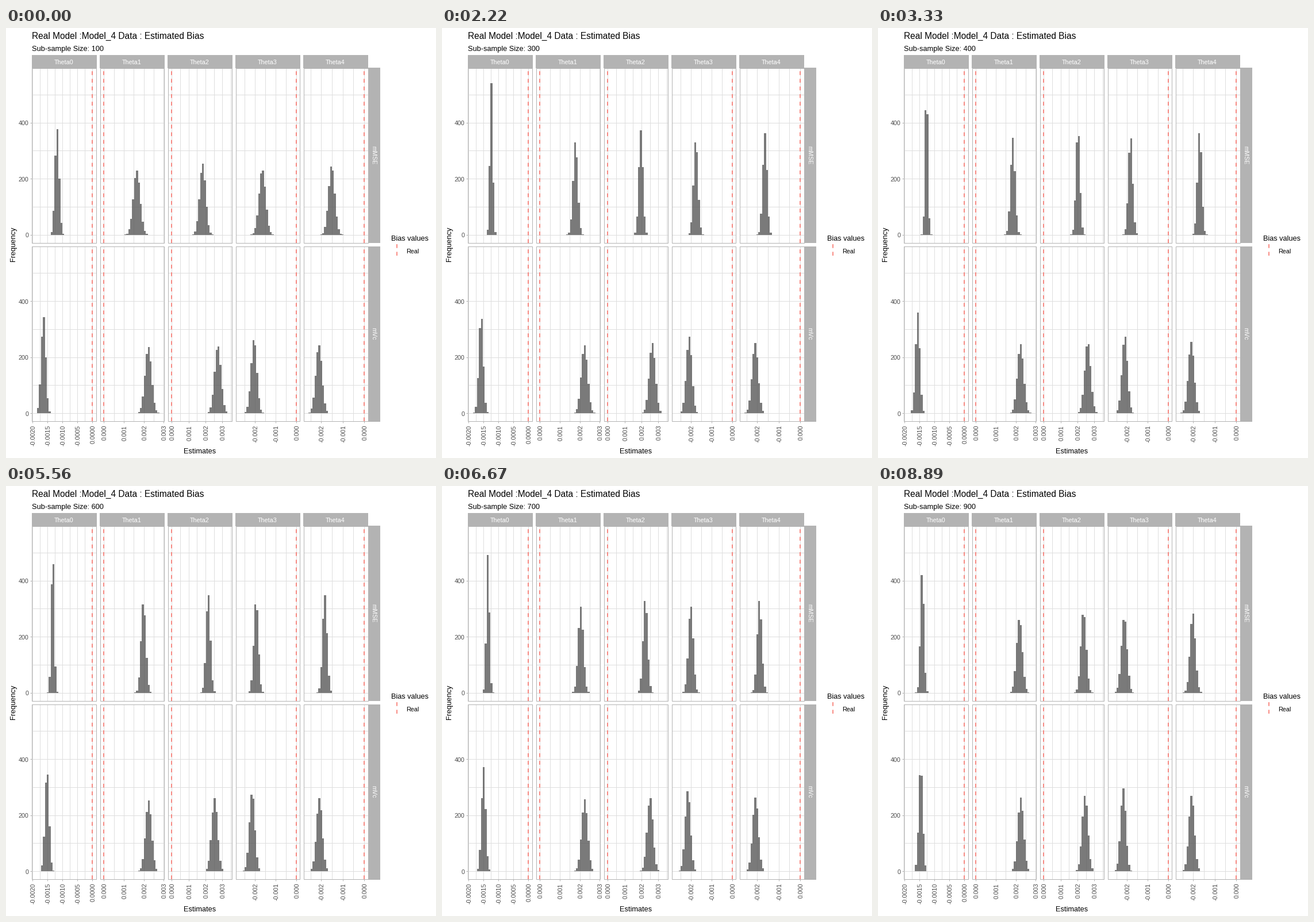
A matplotlib script for the animation above (10 s loop, 748 by 748 pixels).

```python
import math

import matplotlib.pyplot as plt
import numpy as np
from matplotlib.animation import FuncAnimation
from matplotlib.patches import Rectangle

SIDE, DPI = 748, 100
PT = 72 / DPI
GREY, GRID, RED, INK = "#B3B3B3", "#DEDEDE", "#F8766D", "#4D4D4D"
SMALL, BASE, BIG = 10.7, 12.8, 15.5

LEFT, PITCH, PANEL_W, PANEL_H = 45.5, 118.1, 111.7, 304
TOPS = (69.5, 380.0)
PAD = PANEL_W / 22
BINS = 30
BIN_W = (PANEL_W - 2 * PAD) / BINS
COUNT_H = PANEL_H / 1.1 / 567
SAMPLES = 1000

STEPS, FRAMES, LOOP = 9, 100, 10000

# Per column: side of zero the estimates lie on, px per 0.001, tick spacing.
AXES = (
    (-1, 52.0, 0.0005),
    (1, 34.7, 0.001),
    (1, 29.3, 0.001),
    (-1, 35.7, 0.001),
    (-1, 37.2, 0.001),
)

# Per column: first centre, last centre and first spread, in bins.
SHAPES = {
    "mMSE": ((10.81, 7.27, 1.00), (16.89, 22.35, 1.71), (15.85, 20.45, 1.54),
             (11.65, 6.45, 1.67), (12.35, 6.77, 1.58)),
    "mVc": ((3.79, 6.49, 1.11), (22.80, 23.03, 1.65), (23.64, 21.20, 1.60),
            (7.34, 5.92, 1.46), (5.80, 6.20, 1.60)),
}


def mmse_path(s):
    """Even drift; narrows quickly, then slowly widens again."""
    return s, 0.58 + 0.28 * s**2 + 0.42 * math.exp(-7 * s)


def mvc_path(s):
    """Drift that slows down a little; narrows slightly."""
    return s**0.85, 1 - 0.1 * s


PATHS = {"mMSE": mmse_path, "mVc": mvc_path}

plt.rcParams["font.family"] = "Liberation Sans"
fig = plt.figure(figsize=(SIDE / DPI, SIDE / DPI), dpi=DPI, facecolor="white")
ax = fig.add_axes([0, 0, 1, 1])
ax.set_xlim(0, SIDE)
ax.set_ylim(SIDE, 0)
ax.axis("off")


def text(x, y, s, size=SMALL, color="black", va="baseline", **kw):
    return ax.text(x, y, s, fontsize=size * PT, color=color, va=va, **kw)


def line(xs, ys, color=GRID, width=1.0, **kw):
    ax.plot(xs, ys, color=color, lw=width * PT, solid_capstyle="butt", **kw)


def box(x, y, w, h, **kw):
    ax.add_patch(Rectangle((x, y), w, h, **kw))


def dashes(x, bottom, top):
    line([x, x], [bottom, top], RED, 1.66, dashes=(4, 4),
         dash_capstyle="butt", zorder=4)


def panel_left(col):
    return LEFT + PITCH * col


def bin_edges(col):
    return panel_left(col) + PAD + BIN_W * np.arange(BINS + 1)


def zero_x(col):
    first = 0 if AXES[col][0] > 0 else BINS - 1
    return bin_edges(col)[first] + BIN_W / 2


def grid_lines(col):
    """Pairs of x and half-tick number for every line inside the panel."""
    side, scale, spacing = AXES[col]
    half = scale * spacing / 0.001 / 2
    room = PANEL_W - PAD - BIN_W / 2
    return [(zero_x(col) + side * k * half, k)
            for k in range(int(room / half) + 1)]


def counts(centre, spread):
    edges = np.arange(BINS + 1) - 0.5
    cdf = [0.5 * (1 + math.erf((e - centre) / spread / math.sqrt(2)))
           for e in edges]
    return np.rint(SAMPLES * np.diff(cdf))


def draw_panel(col, top):
    left, bottom = panel_left(col), top + PANEL_H
    base = bottom - PANEL_H / 22
    for n in range(0, 600, 100):
        line([left, left + PANEL_W], [base - n * COUNT_H] * 2, zorder=1)
    for x, _ in grid_lines(col):
        line([x, x], [top, bottom], zorder=1)
    bars = ax.stairs(np.full(BINS, base), bin_edges(col), baseline=base,
                     fill=True, color="#595959", alpha=0.8, lw=0, zorder=3)
    dashes(zero_x(col), bottom, top)
    box(left, top, PANEL_W, PANEL_H, fill=False, ec=GREY, lw=PT, zorder=5)
    return bars, base


def draw_row(name, top):
    base = top + PANEL_H * 21 / 22
    for n in (0, 200, 400):
        y = base - n * COUNT_H
        line([LEFT - 3.3, LEFT], [y, y], GREY)
        text(39.3, y + 4.4, str(n), color=INK, ha="right")
    right = panel_left(4) + PANEL_W
    box(right, top - 0.5, 21.5, PANEL_H + 1, fc=GREY, ec="none", zorder=2)
    text(639.2, top + PANEL_H / 2, name, color="white", va="center",
         rotation=-90, ha="center", zorder=6)


def draw_column(col):
    left, bottom = panel_left(col), TOPS[1] + PANEL_H
    side, _, spacing = AXES[col]
    digits = 4 if spacing < 0.001 else 3
    box(left - 0.5, 47, PANEL_W + 1, 22.5, fc=GREY, ec="none", zorder=2)
    text(left + PANEL_W / 2 - 0.8, 63, f"Theta{col}", color="white",
         ha="center", zorder=6)
    for x, k in grid_lines(col):
        if k % 2 == 0:
            line([x, x], [bottom, bottom + 3.3], GREY)
            text(x + 1.4, 690.8, f"{side * (k // 2) * spacing:.{digits}f}",
                 color=INK, va="top", rotation=90, ha="center")


panels = []
for name, top in zip(SHAPES, TOPS):
    draw_row(name, top)
    for col in range(len(AXES)):
        panels.append((name, col, *draw_panel(col, top)))
for col in range(len(AXES)):
    draw_column(col)

text(45, 19, "Real Model :Model_4 Data : Estimated Bias", BIG)
subtitle = text(45, 39.5, "", BASE)
text(337, 740, "Estimates", BASE, ha="center")
text(13, 376, "Frequency", BASE, va="center", rotation=90, ha="center")
text(670, 370, "Bias values", BASE)
text(696, 392, "Real")
dashes(680.5, 395.5, 375.5)


def update(i):
    step = (i * STEPS + STEPS - 1) // FRAMES
    subtitle.set_text(f"Sub-sample Size: {100 * (step + 1)}")
    for name, col, bars, base in panels:
        start, end, spread = SHAPES[name][col]
        drift, width = PATHS[name](step / (STEPS - 1))
        n = counts(start + (end - start) * drift, spread * width)
        bars.set_data(base - n * COUNT_H, bin_edges(col), base)
    return [subtitle] + [p[2] for p in panels]


anim = FuncAnimation(fig, update, frames=FRAMES, interval=LOOP // FRAMES,
                     repeat=True, repeat_delay=0, blit=False)
plt.show()
```
